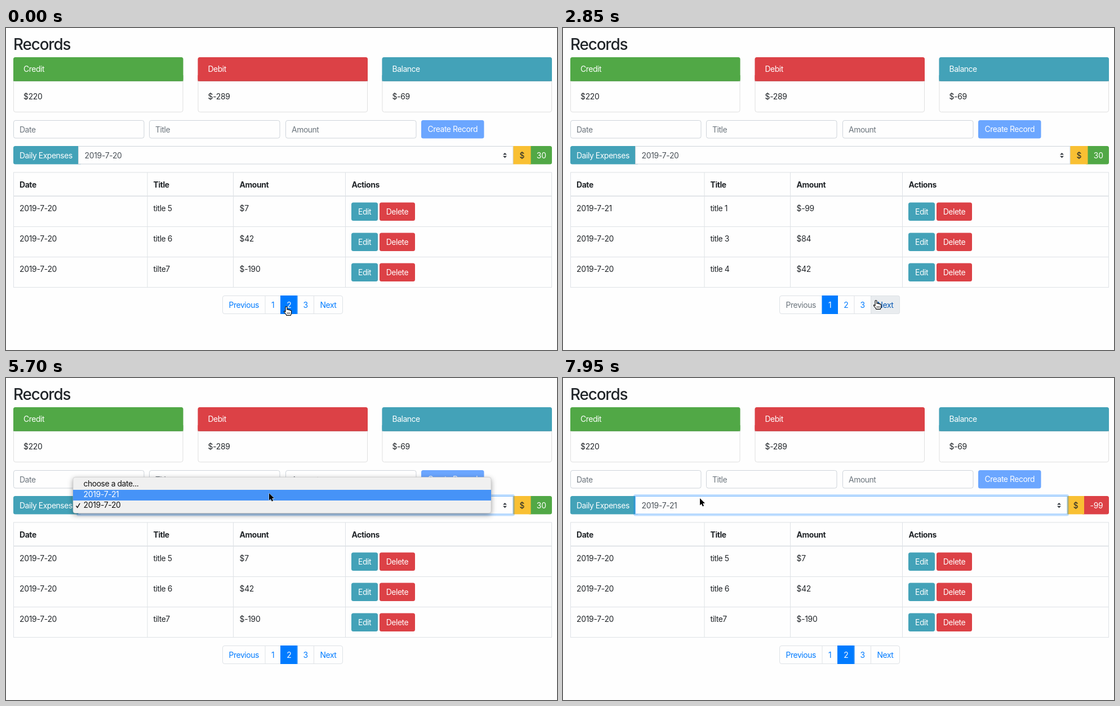
Animation of 978x573 px, one loop 8000 ms. Source, as an HTML page:

```html
<!DOCTYPE html>
<html lang="en">
<head>
<meta charset="utf-8">
<title>Records</title>
<style>
  html, body { margin: 0; width: 100%; height: 100%; overflow: hidden; background: #fefefe; }
  svg { display: block; }
  text { font: 13.9px Inter, "Open Sans", sans-serif; letter-spacing: -.031em; white-space: pre; }
  text.num { letter-spacing: -.02em; }
  text.bold { font-weight: 700; letter-spacing: -.028em; }
  text.title { font-size: 27.8px; font-weight: 500; letter-spacing: -.04em; }
  .menu { filter: drop-shadow(0 3px 5px rgba(0, 0, 0, .38)); }
</style>
</head>
<body>
<svg id="stage" width="978" height="573" viewBox="0 0 978 573"></svg>
<script>
const LOOP = 8000, STEP = 150;
const INK = '#212529', MUTED = '#6c757d', FIELD = '#495057', LINE = '#dee2e6', BORDER = '#ced4da';
const GREEN = '#51a846', RED = '#dc4146', TEAL = '#43a2b8', YELLOW = '#f9c033', BLUE = '#007bff';
const WHITE = '#fefefe';

const PAGES = {
  1: [['2019-7-21', 'title 1', '$-99'], ['2019-7-20', 'title 3', '$84'], ['2019-7-20', 'title 4', '$42']],
  2: [['2019-7-20', 'title 5', '$7'], ['2019-7-20', 'title 6', '$42'], ['2019-7-20', 'tilte7', '$-190']],
  3: [['2019-7-20', 'title 8', '$45']]
};
// [time, page shown from then on]
const PAGE_TURNS = [[0, 2], [900, 3], [1500, 2], [2550, 1], [3150, 2]];
// [time, x, y] of the pointer tip
const POINTER = [
  [0, 498, 496], [300, 498, 496], [750, 531, 492], [900, 531, 492], [1350, 430, 393], [1800, 430, 393],
  [2400, 429, 488], [2550, 429, 488], [2850, 556, 485], [3150, 556, 485], [4050, 522, 166],
  [4650, 180, 188], [5100, 495, 222], [5250, 478, 224], [5550, 470, 222], [5700, 467, 205],
  [6450, 467, 205], [6750, 450, 226], [6900, 432, 249], [7050, 400, 252], [7350, 290, 226],
  [7650, 290, 226], [7950, 243, 214]
];
// [left, right, label, page it is disabled on]
const PAGER = [[384.5, 460, 'Previous', 1], [460, 487.5, '1'], [487.5, 517, '2'],
               [517, 546.5, '3'], [546.5, 597.5, 'Next', 3]];

function pointerAt(t) {
  const i = POINTER.findIndex(key => key[0] > t);
  if (i < 0) return POINTER[POINTER.length - 1].slice(1);
  const [t0, x0, y0] = POINTER[i - 1], [t1, x1, y1] = POINTER[i];
  const k = (t - t0) / (t1 - t0);
  return [x0 + (x1 - x0) * k, y0 + (y1 - y0) * k];
}

const rect = (x, y, w, h, fill, stroke = 'none', r = 0) =>
  `<rect x="${x}" y="${y}" width="${w}" height="${h}" rx="${r}" fill="${fill}" stroke="${stroke}"/>`;

const path = (d, attrs) => `<path d="${d}" ${attrs}/>`;

function text(x, y, label, fill = INK, anchor = 'start', style = '') {
  const kind = style || (/^[$\d-]/.test(label) ? 'num' : '');
  return `<text x="${x}" y="${y}" fill="${fill}" text-anchor="${anchor}" class="${kind}">${label}</text>`;
}

const button = (x, y, w, label, fill) =>
  rect(x, y, w, 32.5, fill, 'none', 3.5) + text(x + w / 2, y + 21.4, label, '#fff', 'middle');

const card = (x, label, value, color) =>
  rect(x + .5, 52.5, 300.5, 97, WHITE, '#dfdfdf', 3.5) +
  rect(x, 52, 301.5, 42.5, color, 'none', 3.5) + rect(x, 84, 301.5, 10.5, color) +
  rect(x, 93.7, 301.5, 1, 'rgba(0,0,0,.125)') +
  text(x + 18, 78, label, '#fff') + text(x + 18, 127, value);

const input = (x, label) =>
  rect(x + .5, 164.5, 231.5, 31.5, WHITE, BORDER, 3.5) + text(x + 11, 185.5, label, MUTED);

function expenses(focused, chosen) {
  const end = chosen ? 895 : 900, split = chosen ? 925 : 931.5;
  const caret = `translate(${end - 14.5} 226.5)`;
  return rect(13, 210, 122, 32.5, TEAL, 'none', 3.5) + text(24, 231.5, 'Daily Expenses', '#fff') +
    rect(split - 5, 210, 974 - split, 32.5, chosen ? RED : GREEN, 'none', 3.5) +
    rect(end, 210, split - end, 32.5, YELLOW) +
    text((end + split) / 2, 231.5, '$', INK, 'middle') +
    text((split + 969) / 2, 231.5, chosen ? '-99' : '30', '#fff', 'middle') +
    (focused ? rect(126.5, 208.5, end - 125, 35.5, 'none', 'rgba(0,123,255,.25)" stroke-width="3', 2) : '') +
    rect(128.5, 210.5, end - 128.5, 31.5, WHITE, focused ? '#80bdff' : BORDER) +
    text(139.5, 231.5, chosen ? '2019-7-21' : '2019-7-20', FIELD) +
    path('M-3.5-1L0-4.6 3.5-1ZM-3.5 1.2L0 4.8 3.5 1.2Z', `fill="#343a40" transform="${caret}"`);
}

function table(rows) {
  const columns = [24, 261.5, 414.5], bottom = 299.5 + rows.length * 54;
  let out = rect(13.5, 257, 955, bottom - 257, 'none', LINE);
  for (const x of [251, 403.5, 602.5]) out += path(`M${x} 257V${bottom}`, `stroke="${LINE}"`);
  out += path('M13 299.2H969', `stroke="${LINE}" stroke-width="1.8"`);
  ['Date', 'Title', 'Amount', 'Actions'].forEach((label, i) =>
    out += text([...columns, 613.5][i], 283.5, label, INK, 'start', 'bold'));
  rows.forEach((row, i) => {
    const y = 299.5 + i * 54;
    if (i) out += path(`M13 ${y}H969`, `stroke="${LINE}"`);
    row.forEach((value, c) => out += text(columns[c], y + 26.5, value));
    out += button(613, y + 11, 47, 'Edit', TEAL) + button(663, y + 11, 63, 'Delete', RED);
  });
  return out;
}

function pager(page, top, hovered) {
  let out = rect(384.5, top + .5, 213, 32, WHITE, LINE, 3.5);
  PAGER.forEach(([left, right, label, disabledOn], i) => {
    const active = label === String(page), hover = i === hovered;
    let color = BLUE;
    if (active) {
      color = '#fff';
    } else if (disabledOn === page) {
      color = MUTED;
    } else if (hover) {
      color = '#0056b3';
      out += rect(left, top + .5, right - left, 32, '#e9ecef', LINE, label.length > 1 ? 3 : 0);
    }
    if (i) out += path(`M${left} ${top}v33`, `stroke="${LINE}"`);
    if (i && PAGER[i - 1][2] === String(page)) out += path(`M${left} ${top}v33`, `stroke="${BLUE}"`);
    if (active) out += rect(left - .5, top, right - left + .5, 33, BLUE);
    out += text((left + right) / 2, top + 21.5, label, color, 'middle');
  });
  return out;
}

function menu(highlight, opacity) {
  const options = ['choose a date...', '2019-7-21', '2019-7-20'];
  return `<g opacity="${opacity}"><g class="menu">${rect(119, 176.5, 742, 64, '#f0f0f0', '#c4c4c4" stroke-width=".6', 4)}</g>` +
    rect(119, 180 + highlight * 19, 742, 19, '#4693f7') +
    options.map((label, i) =>
      text(137.5, 193 + i * 19, label, i === highlight ? '#fff' : '#111')).join('') +
    path('M124.5 227.5l2.3 3 4.3-7.5',
      `fill="none" stroke="${highlight === 2 ? '#fff' : '#111'}" stroke-width="1.5"`) + '</g>';
}

function pointer(x, y, hand) {
  const place = `transform="translate(${x} ${y})" stroke-linejoin="round"`;
  if (!hand) return path('M0 0V12.6L2.9 9.9 4.9 14.4 7 13.5 5.1 9.1H9Z',
    `${place} fill="#000" stroke="#fff" stroke-width="1" paint-order="stroke"`);
  return path('M-2 1C-2-.7 1-.7 1 1V5.5C1 4.3 3.8 4.3 3.8 6 3.8 4.9 6.3 5.1 6.3 6.7 6.6 5.9 8.6 6 8.6 8V11Q8.6 13 7.2 15.4H0Q-1 13.2-4.4 9.5C-5 7.6-3.3 7.2-2 9.2Z',
    `${place} fill="#fff" stroke="#000" stroke-width="1.1"`) +
    path('M1.3 10v3M3.5 10v3M5.7 10v3', `${place} stroke="#000" stroke-width=".8"`);
}

const fixedPart =
  text(13, 38.7, 'Records', INK, 'start', 'title') +
  card(13, 'Credit', '$220', GREEN) + card(340.5, 'Debit', '$-289', RED) + card(667.5, 'Balance', '$-69', TEAL) +
  input(13, 'Date') + input(254, 'Title') + input(496, 'Amount') +
  button(737, 164, 111.5, 'Create Record', '#6ba6ff');

function scene(t) {
  const page = PAGE_TURNS.filter(turn => turn[0] <= t).pop()[1];
  const rows = PAGES[page], top = 314 + rows.length * 54;
  const [x, y] = pointerAt(t);
  const hovered = y >= top && y <= top + 33
    ? PAGER.findIndex(([left, right, , off]) => x >= left && x < right && off !== page) : -1;
  const open = t >= 5400 && t < 6300;
  return fixedPart + expenses(t >= 5400, t >= 6150) + table(rows) + pager(page, top, hovered) +
    (open ? menu(t < 5700 ? 2 : 1, t >= 6150 ? .4 : 1) : '') + pointer(x, y, hovered >= 0);
}

const stage = document.getElementById('stage');
let shown = -1;
function draw() {
  const t = Math.floor(performance.now() % LOOP / STEP) * STEP;
  if (t !== shown) stage.innerHTML = scene(shown = t);
  requestAnimationFrame(draw);
}
draw();
</script>
</body>
</html>
```
